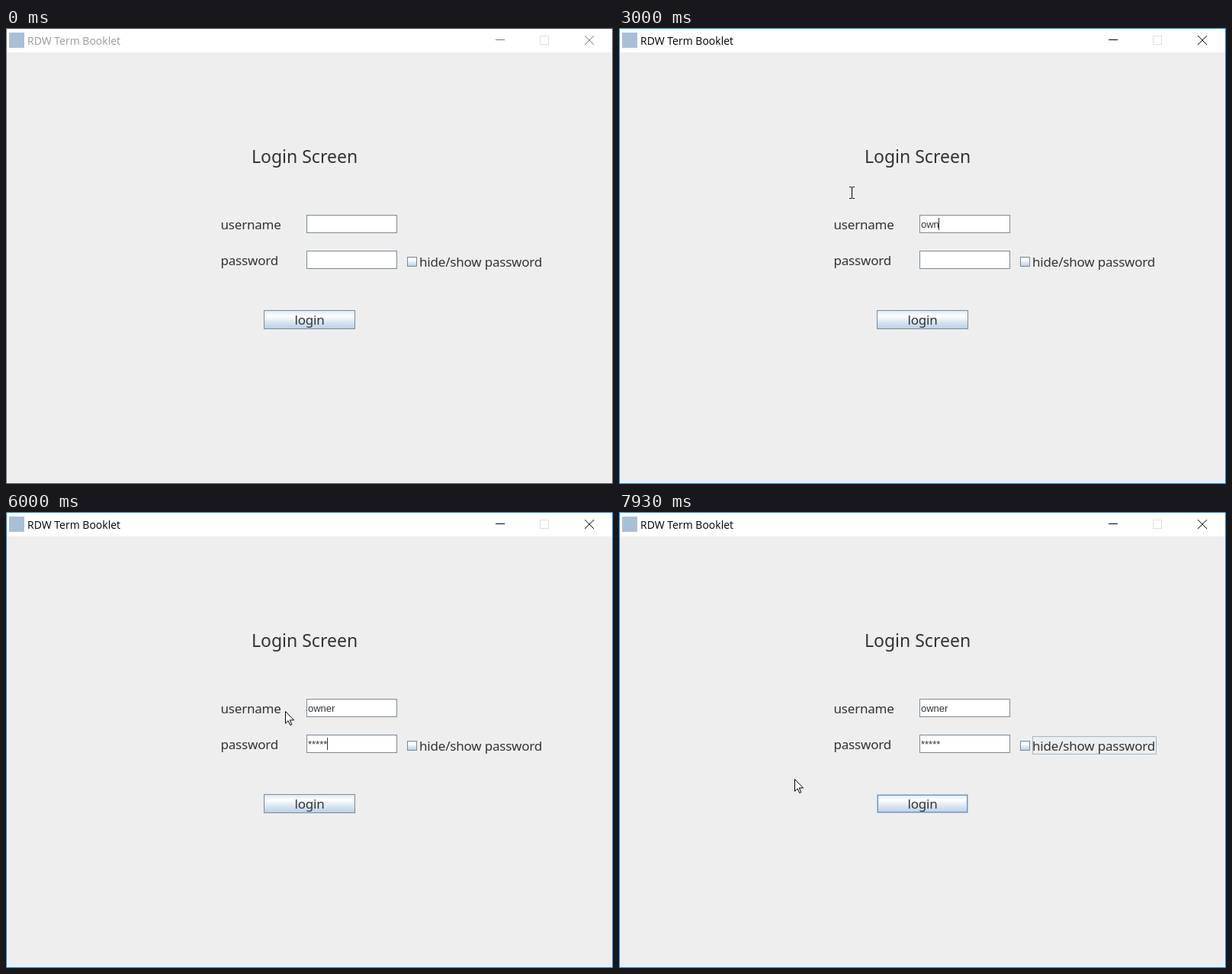
An HTML page for the animation above (8 s loop, 796 px wide and 598 px high).

```html
<!DOCTYPE html>
<html lang="en">
<head>
<meta charset="utf-8">
<title>Login Screen</title>
<style>
html, body { margin: 0; width: 100%; height: 100%; overflow: hidden; }
svg { display: block; width: 796px; height: 598px; }
text { white-space: pre; fill: #333; }
.label { font: 17px "Noto Sans", sans-serif; letter-spacing: -.2px; }
.heading { font: 23px "Noto Sans", sans-serif; }
.bar { font: 14px "Open Sans", sans-serif; }
.entry { font: 13px "Liberation Sans", Arial, sans-serif; }
.crisp { shape-rendering: crispEdges; }
</style>
</head>
<body>
<svg viewBox="0 0 796 598">
  <defs>
    <linearGradient id="steel" x1="0" y1="0" x2="0" y2="1">
      <stop offset="0" stop-color="#dde8f3"/>
      <stop offset=".3" stop-color="#fff"/>
      <stop offset=".6" stop-color="#dde8f3"/>
      <stop offset="1" stop-color="#b8cfe5"/>
    </linearGradient>
  </defs>

  <rect width="796" height="598" fill="#eee"/>
  <rect width="796" height="32" fill="#fff"/>
  <rect x="4" y="6" width="20" height="20" fill="#a9bfd5"/>
  <text id="caption" class="bar" x="28" y="22">RDW Term Booklet</text>
  <g id="controls" fill="none">
    <path d="M642 15.5H654" class="crisp"/>
    <path d="M759 10.2L771 22M771 10.2L759 22"/>
  </g>
  <rect x="700.5" y="10.5" width="11" height="11" fill="none" stroke="#ddd"/>
  <g id="idleEdge" fill="none" class="crisp">
    <path d="M0 .5H796" stroke="#40343c"/>
    <path d="M.5 0V598" stroke="#777080"/>
    <path d="M795.5 0V598" stroke="#55525c"/>
    <path d="M0 597.5H796" stroke="#48444e"/>
  </g>
  <rect id="liveEdge" x=".5" y=".5" width="795" height="597" fill="none" stroke="#1883d7"/>

  <text class="heading" x="322" y="177">Login Screen</text>
  <text class="label" x="281.5" y="264">username</text>
  <text class="label" x="281.5" y="311">password</text>

  <g fill="#fff" stroke="#7a8a99">
    <rect x="394.5" y="245.5" width="118" height="23"/>
    <rect x="394.5" y="292.5" width="118" height="23"/>
  </g>
  <text id="user" class="entry" x="396" y="262"></text>
  <text id="pass" class="entry" x="396" y="309"></text>
  <rect id="caret" class="crisp" width="1" height="16" fill="#333"/>

  <rect id="box" x="526.5" y="300.5" width="12" height="12" stroke="#7a8a99"/>
  <path id="tick" d="M529.8 305.5V309.5L535.8 303.8" fill="none" stroke="#222" stroke-width="2"/>
  <rect id="focus" x="542.5" y="294.5" width="162" height="23" fill="none" stroke="#a3b8cc"/>
  <text class="label" x="542" y="313">hide/show password</text>

  <rect x="338.5" y="370.5" width="119" height="24" fill="url(#steel)" stroke="#7a8a99"/>
  <g id="hover" fill="none">
    <rect x="338.5" y="370.5" width="119" height="24" stroke="#b0c4d8"/>
    <rect x="339.5" y="371.5" width="117" height="22" stroke="#6b97c2"/>
  </g>
  <text class="label" x="398" y="389" text-anchor="middle">login</text>

  <path id="arrow" d="M.5 .5V16.2L4.1 12.8L6.7 18.5L8.8 17.6L6.3 11.9H11.5Z" fill="#fff" stroke="#000"/>
  <path id="beam" class="crisp" d="M-3 -7.5H0M1 -7.5H4M.5 -7V7M-3 7.5H0M1 7.5H4" fill="none" stroke="#000"/>
</svg>
<script>
const LOOP = 8000, STEP = 200 / 3;
const WORD = "owner";
const el = id => document.getElementById(id);
const [caption, controls, idleEdge, liveEdge, user, pass, caret, box, tick, focusRing, hover, arrow, beam] =
  ["caption", "controls", "idleEdge", "liveEdge", "user", "pass", "caret", "box", "tick", "focus", "hover", "arrow", "beam"].map(el);

// Pointer path: step, x, y
const path = [
  [3, 458, 95], [4, 560, 135], [5, 635, 160], [6, 635, 160], [7, 680, 157], [8, 706, 153],
  [9, 710, 154], [10, 690, 155], [11, 645, 157], [12, 591, 160], [14, 480, 172],
  [16, 390, 193], [18, 325, 209], [19, 308, 215], [20, 305, 216], [82, 305, 216],
  [83, 312, 223], [87, 349, 249], [91, 371, 265], [107, 371, 265], [109, 354, 274],
  [112, 312, 299], [115, 262, 333], [118, 233, 350], [119, 230, 350]
];
const userKeys = [42, 43, 45, 46, 48];
const passKeys = [61, 62, 63, 66, 69];

const show = (node, on) => node.setAttribute("visibility", on ? "visible" : "hidden");
const within = (n, a, b) => n >= a && n < b;
const typed = (keys, n) => keys.filter(k => k <= n).length;

function pointer(n) {
  const i = path.findIndex(p => p[0] >= n);
  if (i <= 0) return path[0].slice(1);
  const [a, ax, ay] = path[i - 1], [b, bx, by] = path[i];
  const f = (n - a) / (b - a);
  return [ax + (bx - ax) * f, ay + (by - ay) * f].map(Math.round);
}

function drawWindow(active) {
  caption.style.fill = active ? "#000" : "#999";
  controls.setAttribute("stroke", active ? "#000" : "#777");
  show(idleEdge, !active);
  show(liveEdge, active);
}

function drawFields(n, plain) {
  const count = typed(passKeys, n);
  user.textContent = WORD.slice(0, typed(userKeys, n));
  pass.textContent = plain ? WORD : "*".repeat(count);
  const inUser = n < 53;
  const field = inUser ? user : pass;
  const width = field.textContent ? field.getComputedTextLength() : 0;
  caret.setAttribute("x", 396 + Math.floor(width));
  caret.setAttribute("y", inUser ? 249 : 296);
  show(caret, within(n, 22, 30) || within(n, 37, 76) || within(n, 84, 91));
}

function draw(ms) {
  const n = Math.min(119, Math.floor((ms + 4) / STEP));
  const plain = within(n, 95, 106);
  drawWindow(n >= 22);
  drawFields(n, plain);

  const pressed = within(n, 93, 95) || within(n, 104, 106);
  box.setAttribute("fill", pressed ? "#a3b8cc" : "url(#steel)");
  show(tick, plain);
  show(focusRing, n >= 93);
  show(hover, n >= 115);

  const [x, y] = pointer(n);
  const overText = within(n, 18, 84);
  for (const node of [arrow, beam]) node.setAttribute("transform", `translate(${x} ${y})`);
  show(arrow, n >= 3 && !overText);
  show(beam, overText);
}

const start = performance.now();
function tickFrame() {
  draw((performance.now() - start) % LOOP);
  requestAnimationFrame(tickFrame);
}
tickFrame();
</script>
</body>
</html>
```
